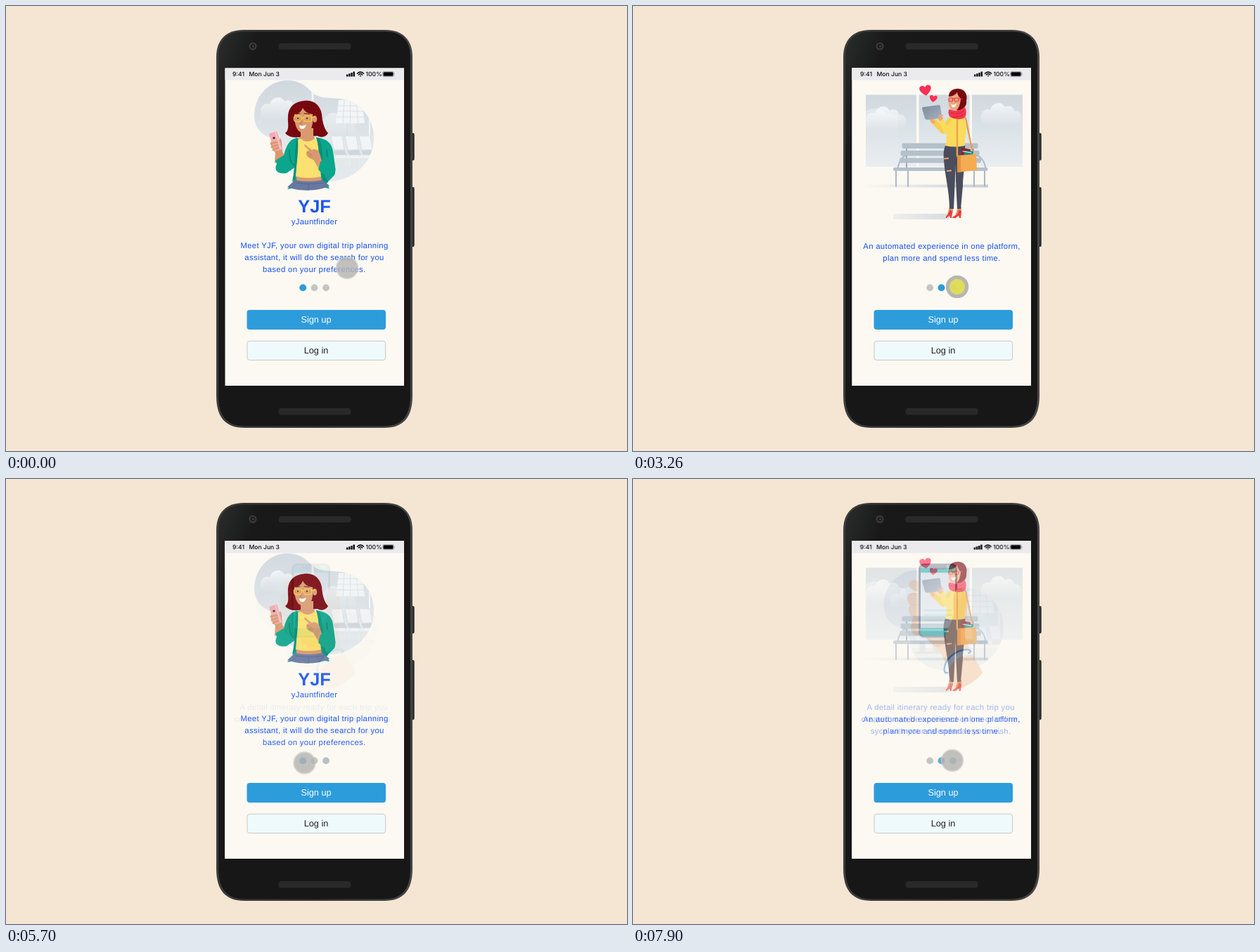
Write an HTML page that moves like this. It is 883 by 634 pixels and loops after 8000 ms.

```html
<!DOCTYPE html>
<html lang="en">
<head>
<meta charset="utf-8">
<title>Trip planner onboarding</title>
<style>
html, body { margin: 0; width: 100%; height: 100%; overflow: hidden; background: #f5e6d3; }
svg.stage { display: block; width: 100%; height: 100%; }
text { font-family: "Liberation Sans", Arial, sans-serif; text-anchor: middle; text-rendering: geometricPrecision; }
.copy { font-size: 11.29px; letter-spacing: .35px; fill: #1550f0; }
.title { font-size: 25.4px; font-weight: 700; fill: #1a56f5; }
.label { font-size: 12.7px; }
.status text { font: 500 8.6px Inter, Roboto, sans-serif; text-anchor: start; fill: #0c0c0c; }
.hair { fill: #78080f; }
.skin { fill: #d99a70; }
.line { fill: none; stroke-linecap: round; stroke-linejoin: round; }

.fade { opacity: 0; animation: 8s linear infinite; }
.fade1 { animation-name: fade1; }
.fade2 { animation-name: fade2; }
.fade3 { animation-name: fade3; }
.fade4 { animation-name: fade4; }
.fade5 { animation-name: fade5; }
@keyframes fade1 { 0% { opacity: 0 } 15.25% { opacity: 0; animation-timing-function: ease-out } 20.63%, 100% { opacity: 1 } }
@keyframes fade2 { 0% { opacity: 0 } 42.5% { opacity: 0; animation-timing-function: ease-out } 47.88%, 100% { opacity: 1 } }
@keyframes fade3 { 0% { opacity: 0 } 67.13% { opacity: 0; animation-timing-function: ease-out } 72.5%, 100% { opacity: 1 } }
@keyframes fade4 { 0% { opacity: 0 } 82.13% { opacity: 0; animation-timing-function: ease-out } 87.5%, 100% { opacity: 1 } }
@keyframes fade5 { 0% { opacity: 0 } 97.38% { opacity: 0; animation-timing-function: ease-out } 100% { opacity: .54 } }

.cursor { animation: travel 8s linear infinite; }
@keyframes travel {
  0%, .75% { transform: translate(485px, 373px) }
  4.75%, 6.25% { transform: translate(437px, 409px) }
  9.5%, 31.9% { transform: translate(437.5px, 400px) }
  34.1%, 52.25% { transform: translate(461px, 400px) }
  53% { transform: translate(456.5px, 401.5px) }
  54.5% { transform: translate(424px, 404.5px) }
  57.25% { transform: translate(423.5px, 403.5px) }
  65.4%, 71.6% { transform: translate(424.5px, 404.5px) }
  73.75% { transform: translate(438px, 403px) }
  76.5% { transform: translate(438px, 402px) }
  80.6%, 87.5% { transform: translate(438.5px, 403.5px) }
  90.6%, 100% { transform: translate(454px, 401px) }
}
.press { opacity: 0; animation: press 8s linear infinite; }
@keyframes press {
  0%, 13.48% { opacity: 0 } 13.5%, 14.9% { opacity: 1 } 15.8% { opacity: 0 }
  40.73% { opacity: 0 } 40.75%, 42.1% { opacity: 1 } 43% { opacity: 0 }
  65.36% { opacity: 0 } 65.38%, 66.8% { opacity: 1 } 67.7% { opacity: 0 }
  80.6% { opacity: 0 } 80.62%, 82% { opacity: 1 } 82.9% { opacity: 0 }
  95.6% { opacity: 0 } 95.62%, 97% { opacity: 1 } 97.9%, 100% { opacity: 0 }
}
</style>
</head>
<body>
<svg class="stage" viewBox="0 0 883 634" xmlns="http://www.w3.org/2000/svg">
<defs>
  <linearGradient id="sky" x2="0" y2="1"><stop stop-color="#d0d8df"/><stop offset="1" stop-color="#e9eef0"/></linearGradient>
  <linearGradient id="shade"><stop stop-color="#c6ced6" stop-opacity="0"/><stop offset="1" stop-color="#c6ced6"/></linearGradient>
  <linearGradient id="mist" x2="0" y2="1"><stop stop-color="#fff" stop-opacity=".75"/><stop offset="1" stop-color="#fff" stop-opacity="0"/></linearGradient>
  <linearGradient id="rim" x2="1" y2="0"><stop stop-color="#3b3c3c"/><stop offset=".5" stop-color="#343434"/><stop offset="1" stop-color="#454646"/></linearGradient>
  <linearGradient id="body" x2=".5" y2=".35"><stop stop-color="#2b2c2c"/><stop offset=".3" stop-color="#191919"/><stop offset="1" stop-color="#171717"/></linearGradient>
  <linearGradient id="glass" x2="1" y2="1"><stop stop-color="#7d8b9c"/><stop offset="1" stop-color="#a3b0be"/></linearGradient>

  <path id="blob" d="M353 157C353 128 374 106 400 106C425 106 430 121 441 127C452 133 466 129 484 134C507 141 523 162 523 187C523 222 495 249 459 250C420 251 392 236 391 209C390 198 386 193 376 188C362 183 353 172 353 157Z"/>
  <clipPath id="blobClip"><use href="#blob"/></clipPath>
  <path id="cloud" d="M0 20C2 12 8 10 13 12C15 2 29-2 34 8C40 4 47 8 47 14C52 13 56 16 57 20V34H0Z" fill="url(#mist)"/>
  <path id="heart" d="M0 6C-9 0-9-6-4.500-7C-2-7.500-.5-6 0-4.500C.5-6 2-7.500 4.500-7C9-6 9 0 0 6Z" fill="#ff2f54"/>
  <g id="chair">
    <path d="M1 0H17L20 20H5Z" fill="#f2f4f5" stroke="#d5dce1" stroke-width=".8"/>
    <path d="M4 21L21 20L24 27H7Z" fill="#cfd7dd"/>
    <path class="line" d="M7 28V42M22 28V42M3 24L1 14" stroke="#e8ecee" stroke-width="1.500"/>
  </g>
  <g id="room">
    <use href="#blob" fill="url(#sky)"/>
    <g clip-path="url(#blobClip)">
      <use href="#cloud" x="362" y="128"/>
      <use href="#cloud" x="440" y="150" opacity=".6"/>
      <path d="M345 184H530V255H345Z" fill="#e3e9ec" opacity=".8"/>
      <path d="M434.500 106H437.500V186H434.500ZM516 130H518V200H516Z" fill="#f4f6f7"/>
      <path d="M473 134H506L510 167H469Z" fill="#f3f5f6"/>
      <path class="line" d="M472 142H507M471 150H508M470 158H509M481 134L479 167M489.500 134V167M498 134L501 167M485 167V184" stroke="#d3dbe1" stroke-width=".8"/>
      <path d="M388 213H535V217H388Z" fill="#f4f6f7" opacity=".8"/>
      <use href="#chair" x="461" y="185"/><use href="#chair" x="481" y="185"/><use href="#chair" x="501" y="185"/>
      <path d="M398 222H462V225H398ZM404 208H412V222H404ZM423 212H435V222H423Z" fill="#cbd4da"/>
    </g>
  </g>

  <g id="status" class="status">
    <path d="M311.500 88.500H566V105.500H311.500Z" fill="#ebebed"/>
  </g>
  <g id="info" class="status">
    <text x="322" y="99.800">9:41</text><text x="345.500" y="99.800">Mon Jun 3</text><text x="511.500" y="99.800">100%</text>
    <path d="M484 97.500H486.300V100.500H484ZM487.200 96.300H489.500V100.500H487.200ZM490.400 95H492.700V100.500H490.400ZM493.600 93.500H495.900V100.500H493.600Z"/>
    <path class="line" d="M499.400 96.200Q504 92 508.600 96.200M501.200 98Q504 95.600 506.800 98" stroke="#0c0c0c" stroke-width="1.500" stroke-linecap="butt"/>
    <path d="M502.700 99.200Q504 98.200 505.300 99.200L504 100.700Z"/>
    <rect x="535.500" y="93.400" width="16" height="7.200" rx="2" fill="none" stroke="#888" stroke-width=".7"/>
    <rect x="536.500" y="94.300" width="14" height="5.400" rx="1.200"/>
    <path d="M552.300 95.800Q553.800 97 552.300 98.300Z" fill="#888"/>
  </g>
  <g id="base">
    <path d="M311.500 88.500H566V541H311.500Z" fill="#fcf9f2"/>
    <use href="#status"/>
    <g fill="#c4c4c4"><circle cx="422.200" cy="401.400" r="4.900"/><circle cx="438.500" cy="401.400" r="4.900"/><circle cx="455" cy="401.400" r="4.900"/></g>
    <rect x="342.500" y="433" width="197.500" height="28" rx="4" fill="#2d9cdb"/>
    <rect x="343" y="477.300" width="196.600" height="27.200" rx="3.500" fill="#effafd" stroke="#c6c9c5"/>
    <text class="label" x="441" y="451.300" fill="#fff">Sign up</text>
    <text class="label" x="441" y="495" fill="#202020">Log in</text>
  </g>
  <circle id="active" cy="401.400" r="4.900" fill="#2d9cdb"/>

  <g id="girl">
    <path class="hair" d="M424 135C438 133 447 142 449 154C450 167 453 176 458 181C455 187 448 188 443 185L415 187C407 188 400 185 397 181C404 176 400 166 401 156C402 143 411 136 424 135Z"/>
    <path class="skin" d="M419 174H437V185Q442 190 436 194H420Q412 190 419 186Z" fill="#c98758"/>
    <path d="M413 188C402 190 398 201 395 213L384 227C381 236 389 240 399 238L412 229L408 250C406 256 402 258 400 261L416 258L417 189ZM441 187C455 189 463 194 465 207C467 222 470 235 467 241L456 252L460 260L446 258L441 230Z" fill="#0ca68c"/>
    <path d="M403 205C403 219 405 225 412 228M456 205C458 220 456 230 448 236L457 251" class="line" stroke="#08806f" stroke-width="1.500"/>
    <path d="M415 190C421 187 421 193 429 193C437 193 437 187 443 189L448 244C438 247 421 247 412 243Z" fill="#fbe16f"/>
    <path class="skin" d="M413 243Q430 247 448 243L449 250H413Z"/>
    <path d="M411 248Q430 252 450 248L460 256C446 264 417 265 400 258Z" fill="#6878a0"/>
    <path class="line" d="M412 252Q430 255 451 252M430 254V262" stroke="#516188" stroke-width=".8"/>
    <path d="M415 189C416 204 414 223 411 246L407 250C412 229 410 204 413 188ZM441 187C446 202 445 224 450 247L455 253C452 228 450 203 446 189Z" fill="#078f7b"/>
    <path class="skin" d="M410 154C411 143 429 140 437 148L436 166C435 178 428 183 421 181C413 178 410 169 410 154Z"/>
    <path class="hair" d="M408 158C407 140 428 136 438 146C444 151 446 163 444 171L438 167L436 154C430 154 424 150 422 145C420 151 415 154 410 154Z"/>
    <ellipse class="skin" cx="439" cy="161" rx="3.200" ry="4.800"/>
    <g class="line" stroke="#f2c744" stroke-width="1.400"><rect x="409.500" y="156.500" width="11" height="8" rx="3"/><rect x="423.500" y="156.500" width="11" height="8" rx="3"/><path d="M420 159H424M434 159L439 158"/></g>
    <path class="line" d="M412 154L418 153M424 153L431 154" stroke="#6a1713" stroke-width="1.200"/>
    <circle cx="415" cy="160" r="1" fill="#35221f"/><circle cx="428" cy="160" r="1" fill="#35221f"/>
    <path class="line" d="M421 163L418 168H421" stroke="#b86f4b"/>
    <path d="M417 170Q422 172 427 169Q425 176 420 175Q417 174 417 170Z" fill="#fff"/>
    <path class="skin" d="M378 191C374 195 378 203 383 209L382 224L397 214L393 208C392 199 393 193 390 188L387 195Z"/>
    <g transform="rotate(-17 383.500 193)"><rect x="377.500" y="179.500" width="12" height="27" rx="2" fill="#f5abb0"/><path d="M387 180V206" stroke="#fbd3d4"/></g>
    <circle cx="381" cy="188" r="1.600" fill="#2d2026"/>
    <path class="line" d="M377 196L385 194M378 201L386 198M380 205L387 202" stroke="#d99a70" stroke-width="3"/>
    <path d="M383 220L398 211L403 229L389 236Z" fill="#0ca68c"/>
    <path class="skin" d="M425 197C428 200 432 203 435 205C441 202 446 207 447 214L451 226L446 234L437 219C429 217 425 211 428 207L431 206L424 199Z"/>
    <path class="line" d="M428 208L435 212M430 212L436 215" stroke="#b87950" stroke-width=".8"/>
    <path d="M447 222L459 213C468 223 471 234 466 240C459 246 450 240 444 233Z" fill="#0ca68c"/>
  </g>

  <g id="bench">
    <path class="line" d="M376 233C379 218 383 214 390 213M502 233C499 218 494 214 488 213M374 234V257M391 234V257M485 234V257M500 234V257" stroke="#acb8c4" stroke-width="2"/>
    <path class="line" d="M389 198V234M484 198V234" stroke="#9eabb8" stroke-width="2"/>
    <g fill="#b4c0cb"><rect x="382.500" y="195.500" width="108" height="7.500" rx="2"/><rect x="380.500" y="206" width="112" height="7.500" rx="2"/><rect x="379" y="216.500" width="116" height="7" rx="2"/><rect x="370" y="230" width="134.500" height="5" rx="2"/></g>
  </g>
  <g id="walker">
    <path class="line" d="M473 160L483 209" stroke="#e99a4a" stroke-width="2.300"/>
    <path class="skin" d="M450 286H455V294L450 300H446ZM462 286H467V294L462 300H458Z" fill="#eda77f"/>
    <path d="M451 290L454 293L453 302H451L450 298L446 302H445Q444 300 448 297ZM464 290L467 293L466 302H464L463 298L459 302H454Q454 300 461 297Z" fill="#ec3a36"/>
    <path d="M445 197H472C474 220 469 239 469 256L466 289H461L459 250L459 226L456 289H450C450 263 443 240 442 219C441 209 442 203 445 197Z" fill="#4b4d5d"/>
    <path class="line" d="M443 217.500L448 217M447 235L452 234.500" stroke="#eca47b" stroke-width="2.200"/>
    <path class="line" d="M460 158L461 214" stroke="#e99a4a" stroke-width="2.300"/>
    <path d="M450 157C458 154 468 156 472 162C477 175 471 184 472 199Q457 202 444 199C447 188 445 180 447 171Z" fill="#fadb5e"/>
    <path class="line" d="M450 164L441 178L427 164" stroke="#f6cf50" stroke-width="8"/>
    <path class="line" d="M458 164L446 178L437 161" stroke="#fadb5e" stroke-width="8"/>
    <path class="line" d="M427 165L423 160M437 161L435 155" stroke="#eda77f" stroke-width="5"/>
    <path d="M413 144L435 141Q437 141 437 143L439 158Q439 160 437 160L418 162Q416 162 415 160L411 146Q411 144 413 144Z" fill="url(#glass)"/>
    <path class="line" d="M435 157L440 156M435 160L440 160" stroke="#eda77f" stroke-width="2.500"/>
    <path class="line" d="M461 161V212" stroke="#eba04e" stroke-width="2.200"/>
    <path d="M467 202L480 204L480 215H467Z" fill="#8f2030"/><path d="M471 206L484 207L482 217H470Z" fill="#1e8a7d"/><path class="line" d="M469 207L481 209" stroke="#fff"/>
    <path d="M461 213L488 211L489 234L461 237Z" fill="#f5ab52"/><path d="M461 213L466 212.700V236.500L461 237Z" fill="#e1933d"/>
    <path class="hair" d="M449 129C449 120 457 117 464 118C473 119 476 128 474 135C475 141 471 147 464 149L454 147Z"/>
    <path d="M449 129C454 129 459 126 461 123C462 128 464 130 466 132C465 144 461 150 455 149C449 147 448 140 449 129Z" fill="#eda77f"/>
    <g class="line" stroke="#e53749" stroke-width="1.200"><rect x="449" y="131" width="5.500" height="5" rx="1.500"/><rect x="457" y="131" width="6" height="5" rx="1.500"/><path d="M454 132H457M463 132H468"/></g>
    <path d="M452 140Q456 142 460 139Q458 146 454 144Z" fill="#fff"/>
    <path d="M450 147C457 151 466 149 471 144C475 147 474 155 472 159C465 163 454 161 450 157C448 153 448 149 450 147Z" fill="#f5364e"/>
    <path class="line" d="M452 152Q463 156 471 149M455 158Q464 159 471 154" stroke="#ce2340" stroke-width="1"/>
  </g>

  <g id="hand">
    <path d="M415 219L447 216L456 187C455 173 456 160 462 156C469 154 475 166 475 181C476 196 471 214 472 224C474 234 479 241 481 247L443 272C445 263 442 252 433 242C423 233 415 229 415 219Z" fill="#f0ba92"/>
    <path d="M444 271L481 248C487 259 493 266 497 276C488 288 473 297 460 299C452 298 454 283 444 271Z" fill="#f0ba92"/>
    <path d="M415 224C428 234 444 231 452 215C448 237 437 242 427 237Z" fill="#dfa176"/>
    <g fill="#eab085"><rect x="392" y="145" width="21" height="14" rx="7" transform="rotate(28 402 152)"/><rect x="390" y="162" width="22" height="17" rx="8"/><rect x="392" y="177" width="20" height="18" rx="8"/><path d="M400 189L411 190V223H402Q394 219 395 210Z"/></g>
    <path class="line" d="M393 178Q399 181 406 179M394 194Q400 197 406 195M396 209Q401 211 406 209" stroke="#d99a70" stroke-width="1"/>
    <rect x="407.500" y="122" width="52" height="102.500" rx="6" fill="#fdfdfe"/>
    <path d="M409 124H458V133.500H409ZM409 212.500H458V223H409Z" fill="#08bfae"/>
    <path d="M421 122H446V126Q446 129 443 129H424Q421 129 421 126Z" fill="#50627d"/>
    <path class="line" d="M413 126H419M448 126H454" stroke="#71ddd2" stroke-width="1.500" stroke-dasharray="2 2" stroke-linecap="butt"/>
    <path class="line" d="M414.500 187H452M414.500 194H452M414.500 201H448" stroke="#c9efeb" stroke-width="2.600"/>
    <rect x="407.500" y="122" width="52" height="102.500" rx="6" fill="none" stroke="#50627d" stroke-width="3"/>
    <path d="M444 226C445 213 455 205 456 191C455 174 455 161 461 157C469 154 475 165 475 181C476 197 471 213 472 226L460 244Z" fill="#f0ba92"/>
    <path d="M458 170Q456 158 462 157Q468 157 468 167Q464 173 458 170Z" fill="#f5c9a6"/>
    <path class="line" d="M446 275C445 262 460 248 479 247" stroke="#e6edf4" stroke-width="7" stroke-linecap="butt"/>
    <path class="line" d="M447 276C440 278 442 265 448 257C456 246 471 241 479 244Q482 246 477 248" stroke="#0d70cf" stroke-width="2.300"/>
  </g>

  <g id="screen1">
    <use href="#base"/><use href="#info"/><use href="#active" x="422.200"/>
    <use href="#room"/><use href="#girl"/>
    <text class="title" x="438.500" y="294">YJF</text>
    <g class="copy">
      <text x="438.500" y="311">yJauntfinder</text>
      <text x="438.500" y="345.200">Meet YJF, your own digital trip planning</text>
      <text x="438.500" y="362.200">assistant, it will do the search for you</text>
      <text x="438.300" y="379.200">based on your preferences.</text>
    </g>
  </g>
  <g id="screen2">
    <use href="#base"/><use href="#info" x="1"/><use href="#active" x="438.500"/>
    <path d="M331 126.500H554V229H331Z" fill="url(#sky)"/>
    <use href="#cloud" x="331" y="141"/><path d="M331 150Q345 141 360 152L376 156V184H331Z" fill="url(#mist)" opacity=".5"/>
    <use href="#cloud" x="495" y="136"/>
    <path d="M403 126H406.500V229.500H403ZM478.500 126H482V229.500H478.500Z" fill="#fcf9f2"/>
    <path d="M326 254.500H505V258.500H326ZM370 296H455L448 304H370Z" fill="url(#shade)"/>
    <use href="#bench"/><use href="#walker"/>
    <use href="#heart" transform="translate(416 121) rotate(-8) scale(1.120)"/>
    <use href="#heart" transform="translate(427 132.500) rotate(8) scale(.74)"/>
    <g class="copy">
      <text x="439" y="345.800">An automated experience in one platform,</text>
      <text x="439" y="362.800">plan more and spend less time.</text>
    </g>
  </g>
  <g id="screen3">
    <use href="#base"/><use href="#info"/><use href="#active" x="455"/>
    <use href="#room" x="3.500" y="24"/><use href="#hand"/>
    <g class="copy">
      <text x="437.600" y="328.900">A detail itinerary ready for each trip you</text>
      <text x="437.600" y="345.900">created, can be accessed online or offline,</text>
      <text x="437.600" y="362.900">sycn with your calendar as your wish.</text>
    </g>
  </g>
</defs>

<path d="M0 0H883V634H0Z" fill="#f5e6d3"/>
<path d="M576 181H579Q580.700 181 580.700 183V218Q580.700 220 579 220H576ZM576 258H579Q580.700 258 580.700 260V341Q580.700 343 579 343H576Z" fill="#2c2c2c"/>
<path d="M338 34H539C564 34 578 48 578 73V555C578 586 565 601 538 601H339C312 601 299 586 299 555V73C299 48 313 34 338 34Z" fill="url(#rim)"/>
<path d="M338 36.500H539C563 36.500 575 49 575 73V555C575 584 563 598.500 538 598.500H339C314 598.500 302 584 302 555V73C302 49 314 36.500 338 36.500Z" fill="url(#body)"/>
<g fill="#292929"><rect x="387.500" y="53" width="103" height="9" rx="4"/><rect x="387.500" y="573" width="103" height="9.500" rx="4"/></g>
<circle cx="351" cy="57.300" r="5.600" fill="#3b3b3b"/><circle cx="351" cy="57.300" r="3.300" fill="#1d1d1d"/><circle cx="351.500" cy="57.300" r="1.300" fill="#444"/>

<use href="#screen1"/>
<use class="fade fade1" href="#screen2"/>
<use class="fade fade2" href="#screen3"/>
<use class="fade fade3" href="#screen1"/>
<use class="fade fade4" href="#screen2"/>
<use class="fade fade5" href="#screen3"/>

<g class="cursor">
  <circle r="16.200" fill="#b9b8b5" fill-opacity=".55"/>
  <circle r="14.800" fill="#b3b2b0" fill-opacity=".6"/>
  <circle r="15.400" fill="none" stroke="#dedcd8" stroke-opacity=".65" stroke-width=".9"/>
  <g class="press">
    <circle r="13.600" fill="none" stroke="#b7b5b2" stroke-width="5"/>
    <circle r="11" fill="#e2e04a" fill-opacity=".85"/>
  </g>
</g>
</svg>
</body>
</html>
```
